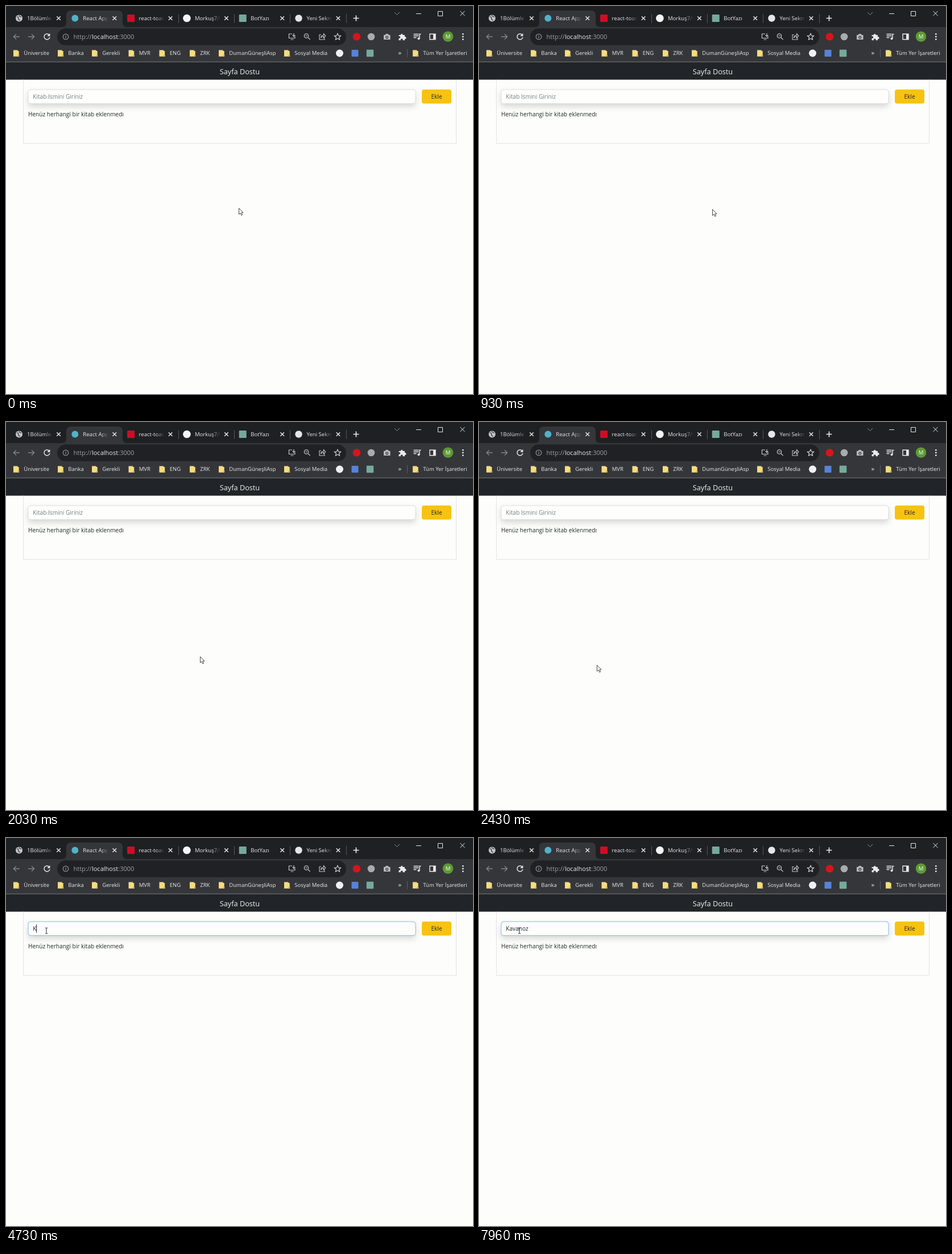
Animation, 821 px wide and 682 px high, one loop 8 s. Source, as an HTML page:

```html
<!DOCTYPE html>
<html lang="tr">
<head>
<meta charset="utf-8">
<title>Sayfa Dostu</title>
<style>
  html, body { margin: 0; width: 100%; height: 100%; overflow: hidden; background: #fdfefb; }
  svg { display: block; width: 821px; height: 682px; }
  text { font-family: "Open Sans", "Noto Sans", sans-serif; white-space: pre; }
  .field { filter: drop-shadow(0 5.3px 5.3px rgba(0, 0, 0, .16)); }
</style>
</head>
<body>
<svg id="stage" viewBox="0 0 821 682" xmlns="http://www.w3.org/2000/svg"></svg>
<script>
const STRIP = '#1f2022', BAR = '#35363a', LIGHT = '#e8eaed', MUTED = '#9aa0a6', INK = '#212529';

const text = (x, y, str, size, fill, extra = '') =>
  `<text x="${x}" y="${y}" font-size="${size}" fill="${fill}" ${extra}>${str}</text>`;
const rect = (x, y, w, h, fill, extra = '') =>
  `<rect x="${x}" y="${y}" width="${w}" height="${h}" fill="${fill}" ${extra}/>`;
const dot = (x, y, r, fill, extra = '') =>
  `<circle cx="${x}" cy="${y}" r="${r}" fill="${fill}" ${extra}/>`;
const line = (d, color = LIGHT, width = 1.3, extra = '') =>
  `<path d="${d}" fill="none" stroke="${color}" stroke-width="${width}" ${extra}/>`;
const cross = (x, y, r, width) =>
  line(`M${x - r} ${y - r}l${2 * r} ${2 * r}m0 ${-2 * r}l${-2 * r} ${2 * r}`, LIGHT, width);
const badge = (x, y, size, fill) => rect(x - size / 2, y - size / 2, size, size, fill, 'rx="1"');

function tabs() {
  const items = [
    ['1Bölümle', true, x => dot(x, 21.5, 6, '#c4c7ca') +
      line(`M${x - 4} 19q3 0 3 3t3 3M${x} 16q0 3 4 3`, '#4b4d50', 1.6)],
    ['React App', true, x => dot(x, 21.5, 6, '#4fb3c9')],
    ['react-toas', true, x => badge(x, 21.5, 13, '#cb0f24')],
    ['Morkuş7/li', true, x => dot(x, 21.5, 6.8, '#f4f5f6')],
    ['BotYazı', false, x => badge(x, 21.5, 13, '#74aa9c')],
    ['Yeni Sekme', true, x => dot(x, 21.5, 6.2, '#e4e6e8')]
  ];
  let out = `<path d="M98 37q8 0 8-8V16q0-8 8-8h83q8 0 8 8v13q0 8 8 8z" fill="${BAR}"/>`;
  items.forEach(([label, cut, icon], i) => {
    const x = 37 + i * 98.3, active = i === 1;
    out += icon(x - 14) + text(x, 25.2, label, 9.6, LIGHT);
    if (cut) out += rect(x + 30, 13, 30, 17, `url(#fade${active ? 'Bar' : 'Strip'})`);
    out += cross(x + 55.5, 21.5, 3.3, 1.4);
    if (i > 1) out += rect(Math.round(x + 69), 14, 1, 16, '#55565a');
  });
  return out + line('M610.5 21.5h10M615.5 16.5v10', LIGHT, 1.7);
}

function windowControls() {
  return line('M683 11l4.5 4.5 4.5-4.5', '#8c8d90', 1) + line('M721 13.5h9', LIGHT, 1) +
    line('M759.5 9.5h8v8h-8z', LIGHT, 1) + cross(802.5, 13, 4, 1);
}

function toolbar() {
  return line('M24 54H13.5m4.5-4.5l-4.7 4.5 4.7 4.5M39 54h10.5m-4.5-4.5l4.7 4.5-4.7 4.5', '#85878a') +
    line('M76.3 51.2a5 5 0 1 0 .7 3.6', LIGHT, 1.5) + `<path d="M77.4 48v5h-5z" fill="${LIGHT}"/>` +
    rect(90, 39.5, 508, 29.5, '#202124', 'rx="14.7"') +
    dot(105, 54, 4.8, 'none', `stroke="${MUTED}" stroke-width="1.1"`) +
    line('M105 53.2v3.4M105 51v1.2', MUTED, 1.2) +
    text(118.5, 58, `http://<tspan fill="${LIGHT}">localhost</tspan>:3000`, 11.05, MUTED) +
    line('M503 49h-5.5v7.5h10.5v-3M500.5 59h5M506 48v5.5m-2.5-2.3l2.5 2.5 2.5-2.5', '#c8cacd', 1.2) +
    dot(528, 52.5, 3.7, 'none', 'stroke="#c8cacd" stroke-width="1.2"') +
    line('M531 55.5l3.7 3.7M526.2 52.5h3.6', '#c8cacd', 1.2) +
    line('M554 50.5h-3v8.5h9v-2.5M553.5 56q.5-4.5 5-4.5v-2.7l3.3 3.7-3.3 3.7v-2.7q-3.5 0-5 2.5z', '#c8cacd', 1.1) +
    line('M583 48.4l1.6 3.7 4 .4-3 2.7.9 4-3.5-2.1-3.5 2.1.9-4-3-2.7 4-.4z', LIGHT, 1.1) +
    dot(616.5, 54, 6.8, '#d8141c') + dot(642, 54, 6.3, '#a9acaf') +
    `<path d="M664 51h2.5l1.2-2h4l1.2 2h2.6v8H664z" fill="#b9bbbe"/>` +
    dot(669.7, 55, 2.5, BAR) + dot(669.7, 55, 1.3, '#b9bbbe') +
    `<path d="M690.5 51h3.2a2 2 0 1 1 4 0h3.3v3.2a2 2 0 1 1 0 3.8v2.2h-3.4a2 2 0 1 0-3.7 0h-3.4v-3.4a2 2 0 1 0 0-3.7z" fill="${LIGHT}"/>` +
    line('M716.5 49.5h9M716.5 52.5h9M716.5 55.5h5M727 57V49.5h2.5', LIGHT, 1.4) + dot(725.5, 57.3, 2, LIGHT) +
    line('M745 49.3h10v9.4h-10z', LIGHT, 1.4) + rect(751, 49, 4, 10, LIGHT) +
    dot(777, 53.7, 9.3, '#5f9a35') + text(777, 57.2, 'M', 9.5, '#fff', 'text-anchor="middle"') +
    [49.3, 54, 58.7].map(y => dot(803.3, y, 1.4, LIGHT)).join('');
}

function bookmarks() {
  const folders = [
    [13, 'Üniversite'], [91, 'Banka'], [151, 'Gerekli'], [215.5, 'MVR'], [269.5, 'ENG'],
    [323, 'ZRK'], [374, 'DumanGüneşliAsp'], [489, 'Sosyal Media'], [715, 'Tüm Yer İşaretleri']
  ];
  return folders.map(([x, label]) =>
    `<path d="M${x} 77.5h7.5v1.5h2.2v9.8h-9.7z" fill="#f6dc7d"/>` +
    rect(x + 7, 86, 3.2, 2.8, '#dcb850') +
    text(x + 18.3, 86.4, label, 9.5, LIGHT)).join('') +
    dot(586.5, 83, 6.5, '#eef0f2') + badge(613.5, 83, 12, '#5484dc') + badge(640, 83, 12.5, '#74aa9c') +
    text(689.5, 86.3, '»', 11.5, LIGHT) + rect(705, 76, 1, 14, '#5f6064');
}

function page() {
  return rect(0, 97.5, 821, 1, '#55585a') + rect(0, 98.5, 821, 31, INK) +
    text(411, 119.6, 'Sayfa Dostu', 12.7, '#f1f2f3', 'text-anchor="middle"') +
    line('M30.5 129.5V241.5H791.5V129.5', '#e3e4e3', 1) +
    `<g class="field">${rect(39, 147, 681, 24.5, '#fefffd', 'rx="4"')}</g>` +
    rect(39, 147, 681, 24.5, 'none', 'id="border" rx="4"') +
    rect(731, 146.7, 52, 24.8, '#f7c30e', 'rx="4"') +
    text(757, 163, 'Ekle', 10.1, INK, 'text-anchor="middle"') +
    text(39, 194.3, 'Henüz herhangi bir kitab eklenmedı', 10.1, INK) +
    text(47.3, 163, 'Kitab Ismini Giriniz', 10.1, '#757a7e', 'id="hint"') +
    text(47.3, 163, '', 10.1, INK, 'id="typed"') +
    rect(47, 152, 1, 14.5, INK, 'id="caret"') +
    `<path id="arrow" d="M.5 .5V11.2L3 8.9l1.8 4 1.8-.8-1.8-3.9h3.3z" fill="#fff" stroke="#33363a" stroke-width=".9"/>` +
    line('M-2.2 -5h1.7l.5.5.5-.5h1.7M0-4.5v9M-2.2 5h1.7l.5-.5.5.5h1.7', '#222', 1, 'id="beam"');
}

const fade = (id, color) => `<linearGradient id="${id}">
  <stop offset="0" stop-color="${color}" stop-opacity="0"/><stop offset=".5" stop-color="${color}"/></linearGradient>`;

const $ = id => document.getElementById(id);
$('stage').innerHTML = `<defs>${fade('fadeBar', BAR)}${fade('fadeStrip', STRIP)}</defs>` +
  rect(0, 0, 821, 682, '#fdfefb') + rect(0, 0, 821, 37, STRIP) + rect(0, 37, 821, 61, BAR) +
  tabs() + windowControls() + toolbar() + bookmarks() + page();

const LOOP = 8000, CLICK = 3730, BLINK = 530;
const WORD = 'Kavanoz';
const KEYS = [4730, 4930, 5300, 5600, 6630, 6830, 7000];
// start time, end time, destination
const MOVES = [[860, 1430, 428, 403], [1730, 2430, 207, 427], [2700, 3330, 71, 163]];

const progress = (t, from, to) => Math.min(1, Math.max(0, (t - from) / (to - from)));
const mix = (a, b, k) => a + (b - a) * k;

function pointerAt(t) {
  let x = 409, y = 355;
  for (const [from, to, tx, ty] of MOVES) {
    const p = progress(t, from, to), k = p * p * (3 - 2 * p);
    x = mix(x, tx, k);
    y = mix(y, ty, k);
  }
  return [Math.round(x), Math.round(y)];
}

function draw(t) {
  const [x, y] = pointerAt(t);
  const overField = x >= 39 && x <= 720 && y >= 147 && y <= 172;
  for (const id of ['arrow', 'beam']) {
    $(id).setAttribute('transform', `translate(${x} ${y})`);
    $(id).setAttribute('visibility', (id === 'beam') === overField ? 'visible' : 'hidden');
  }

  const count = KEYS.filter(k => k <= t).length;
  const typed = $('typed');
  typed.textContent = WORD.slice(0, count);
  $('hint').setAttribute('visibility', count ? 'hidden' : 'visible');

  const since = t - (count ? KEYS[count - 1] : CLICK);
  const caretOn = since >= 0 && Math.floor(since / BLINK) % 2 === 0;
  $('caret').setAttribute('visibility', caretOn ? 'visible' : 'hidden');
  $('caret').setAttribute('x', Math.round(47 + (count ? typed.getComputedTextLength() : 0)));

  const focus = progress(t, CLICK + 30, CLICK + 230);
  const color = [[217, 134], [222, 183], [222, 246]].map(([a, b]) => Math.round(mix(a, b, focus)));
  $('border').setAttribute('stroke', `rgb(${color})`);
}

const start = performance.now();
function tick() {
  draw((performance.now() - start) % LOOP);
  requestAnimationFrame(tick);
}
tick();
</script>
</body>
</html>
```
